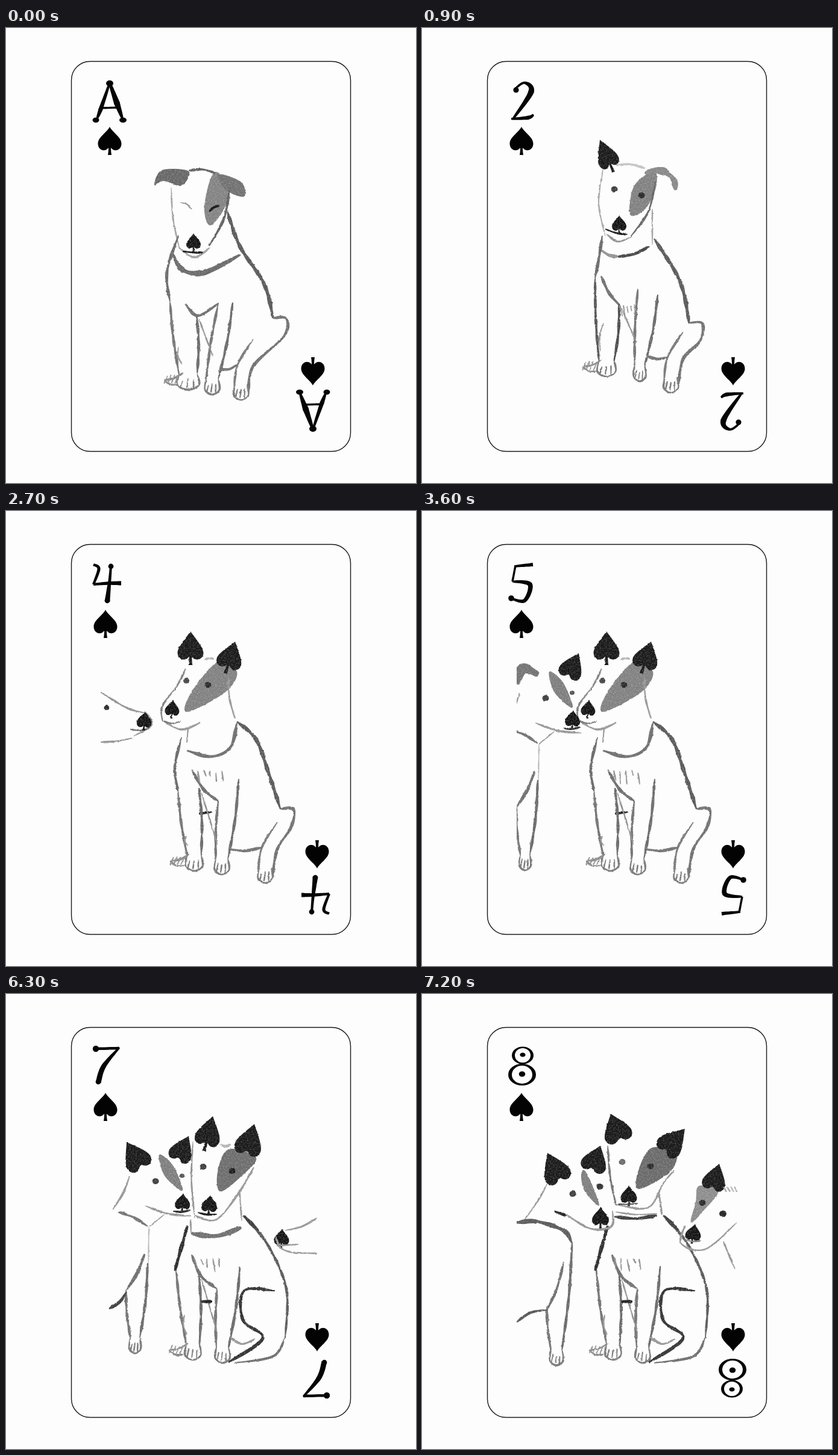
An HTML page that plays this animation: 680 px wide and 756 px high, repeating every 8000 ms.

```html
<!DOCTYPE html>
<html lang="en">
<head>
<meta charset="utf-8">
<title>Dogs of spades</title>
<style>
  html, body { margin: 0; width: 100%; height: 100%; overflow: hidden; background: #fdfdfd; }
  svg { display: block; width: 680px; height: 756px; }
</style>
</head>
<body>
<svg id="stage" viewBox="0 0 680 756">
  <defs>
    <filter id="brush" filterUnits="userSpaceOnUse" x="100" y="170" width="470" height="470" color-interpolation-filters="sRGB">
      <feTurbulence type="fractalNoise" baseFrequency=".2" numOctaves="2" seed="4" result="edge"/>
      <feDisplacementMap in="SourceGraphic" in2="edge" scale="2.6" xChannelSelector="R" yChannelSelector="G" result="rough"/>
      <feTurbulence type="fractalNoise" baseFrequency=".4" numOctaves="2" seed="9"/>
      <feColorMatrix values="0 0 0 0 0  0 0 0 0 0  0 0 0 0 0  .5 0 0 0 .7" result="grain"/>
      <feComposite in="rough" in2="grain" operator="in"/>
    </filter>
    <clipPath id="window"><rect x="157" y="170" width="366" height="470"/></clipPath>
  </defs>
  <rect x="108.5" y="55.5" width="463" height="648" rx="31" fill="none" stroke="#1a1a1a" stroke-width="1.4"/>
</svg>
<script>
const stage = document.getElementById('stage');
let out = '';
let seed = 7;
const random = () => (seed = seed * 16807 % 2147483647) / 2147483647;

const tone = g => `rgb(${g},${g},${g})`;
const parse = text => text.split(' ').map(p => p.split(',').map(Number));
const outline = pts => 'M' + pts.map(p => p[0].toFixed(1) + ' ' + p[1].toFixed(1)).join('L') + 'Z';

// Catmull-Rom samples [x, y, width factor] through a few key points
function smooth(points, closed) {
  const n = points.length, spans = closed ? n : n - 1, steps = 10;
  const at = i => points[closed ? (i + n) % n : Math.max(0, Math.min(n - 1, i))];
  return Array.from({ length: spans * steps + 1 }, (_, k) => {
    const i = Math.min(spans - 1, Math.floor(k / steps)), t = k / steps - i;
    const [a, b, c, d] = [at(i - 1), at(i), at(i + 1), at(i + 2)];
    const mix = j => b[j] + t / 2 * (c[j] - a[j] + t * (2 * a[j] - 5 * b[j] + 4 * c[j] - d[j] + t * (3 * (b[j] - c[j]) + d[j] - a[j])));
    const wb = b[2] ?? 1, wc = c[2] ?? 1;
    return [mix(0), mix(1), wb + (wc - wb) * t];
  });
}

function brush(width, grey, points, wobble = .22) {
  const s = smooth(points), last = s.length - 1, left = [], right = [];
  s.forEach(([x, y, f], i) => {
    const p = s[Math.max(0, i - 1)], q = s[Math.min(last, i + 1)];
    const dx = q[0] - p[0], dy = q[1] - p[1], len = Math.hypot(dx, dy) || 1;
    const taper = wobble ? Math.min(1, .45 + Math.min(i, last - i) * .15) : 1;
    const h = width / 2 * f * taper * (1 + wobble * Math.sin(x * .13 + y * .21));
    left.push([x - dy / len * h, y + dx / len * h]);
    right.unshift([x + dy / len * h, y - dx / len * h]);
  });
  out += `<path d="${outline(left.concat(right))}" fill="${tone(grey)}"/>`;
}
const ink = (width, grey, text) => brush(width, grey, parse(text));
const pen = (width, text) => brush(width, 5, parse(text), 0);
// Stroke between two points, pushed sideways by bow (down when it runs right, left when it runs down)
function arc(width, grey, x1, y1, x2, y2, bow = 0) {
  const dx = x2 - x1, dy = y2 - y1, k = bow / Math.hypot(dx, dy);
  brush(width, grey, [[x1, y1], [(x1 + x2) / 2 - dy * k, (y1 + y2) / 2 + dx * k], [x2, y2]]);
}
const wash = (grey, text) => out += `<path d="${outline(smooth(parse(text), true))}" fill="${tone(grey)}"/>`;
const dot = (x, y, rx, ry = rx, grey = 5) => out += `<ellipse cx="${x}" cy="${y}" rx="${rx}" ry="${ry}" fill="${tone(grey)}"/>`;
const eye = (x, y, grey = 40, r = 5.5) => dot(x, y, r, r * .9, grey);
function ring(x, y, rx, ry, side, top) {
  const loop = (a, b) => `M${x - a} ${y}a${a} ${b} 0 1 0 ${2 * a} 0a${a} ${b} 0 1 0 ${-2 * a} 0Z`;
  out += `<path fill-rule="evenodd" fill="#050505" d="${loop(rx, ry) + loop(rx - side, ry - top)}"/>`;
}

const PIP = 'C3 8 19.5 17 19.5 28', PIP_BACK = 'C-19.5 17-3 8 0 0Z';
const EAR = 'C5 7 19.5 22 19.5 30', EAR_BACK = 'C-19.5 22-5 7 0 0Z';
function spade(x, y, w, h, turn, stem, grey, side, back) {
  const foot = stem ? 'C2 40 2.5 44 3 47L-3 47C-2.5 44-2 40-2 35' : 'L-2 35';
  out += `<path transform="translate(${x} ${y}) rotate(${turn}) scale(${w / 39} ${h / (stem ? 47 : 40)})" fill="${tone(grey)}"
    d="M0 0${side}C19.5 39 8 43 2 35${foot}C-8 43-19.5 39-19.5 ${side === EAR ? 30 : 28}${back}"/>`;
}
const ear = (x, y, w, h, turn, stem = false) => spade(x, y, w, h, turn, stem, 24, EAR, EAR_BACK);
const nose = (x, y, w, turn = 0) => spade(x, y, w, w * 1.28, turn, true, 18, PIP, PIP_BACK);

const ranks = {
  A() {
    dot(172, 92, 6, 5); dot(149, 153, 5.5, 4.2); dot(194, 153, 6, 4.2);
    pen(4.5, '171,94,.8 157,135,1.6 150,153,.5');
    pen(9, '173,94,.5 184,125,1.1 194,153,.3');
    pen(3.4, '159,133 188,132');
  },
  2() {
    dot(156, 103, 4.6);
    pen(8, '153,102,.4 170,91,.5 181,106,1.2 151,151,.4');
    pen(6.5, '148,151,.5 176,149,1 185,144,.5');
  },
  3() {
    dot(149, 98, 4.6); dot(147, 145, 4.5);
    pen(8, '147,97,.4 168,90,.6 178,103,1.1 160,118,.4');
    pen(8, '160,118,.4 182,133,1.2 166,151,.6 146,145,.4');
  },
  4() {
    pen(4, '145,89 154,96,1.3 145,122'); pen(5.5, '145,122,.7 170,120 191,120,1.3');
    dot(174, 92, 4.4); dot(168, 149, 4.3); pen(6, '174,91,.6 172,115,.8 168,150,1.5');
  },
  5() {
    pen(5, '153,92,.7 184,89,1.2'); pen(3.5, '155,91 150,117');
    pen(8, '150,117,.4 179,122,1 170,149,.8 147,145,.4'); dot(148, 145, 4.8);
  },
  6() {
    dot(179, 91, 4.6); pen(6, '179,91,.8 158,109,.7 146,134,1.2');
    ring(165, 136, 21, 18, 5, 2.5); dot(164.5, 138, 5.3);
  },
  7() {
    dot(149, 91, 5.2); dot(153, 146, 4.3);
    pen(4.5, '149,91 188,90'); pen(9, '188,89,.3 162,120,.9 153,147,1');
  },
  8() {
    ring(167, 102, 18, 14.5, 5, 2.5); dot(167, 101, 4.6, 3.6);
    ring(166, 134, 23, 18, 6, 3); dot(166, 133, 5.3, 4.6);
  }
};

// Paw standing on (x, y) with a few toe lines
function paw(x, y, w, grey = 120) {
  brush(3, grey, [[x - w * .42, y - 26], [x - w / 2, y - 8], [x, y], [x + w / 2, y - 8], [x + w * .42, y - 26]]);
  for (let i = -1; i <= 1; i++) arc(2.2, grey, x + i * w / 4, y - 15 - 5 * random(), x + i * w / 3.2 - 2, y - 3);
}
// Foreleg from its left and right top to a paw
function leg(x1, y1, x2, y2, x, y, w, grey = 115) {
  arc(4.2, grey, x1, y1, x - w * .42, y - 26, 2);
  arc(4.4, grey - 10, x2, y2, x + w * .42, y - 26, -3);
  paw(x, y, w);
}
function lyingPaw(x, y) {
  arc(3, 135, x + 32, y - 12, x, y, -3);
  arc(3, 135, x, y, x + 24, y + 7, 4);
  for (let i = 1; i < 5; i++) arc(2, 145, x + 6 * i, y - 6 - random() * 4, x + 6 * i - 6, y + 6);
}
function tuft(x, y, w) {
  for (let i = 0; i < 5; i++) {
    const px = x + w * i / 4;
    arc(2.2, 145, px, y + 4 * random(), px + 5 * random(), y + 10 + 16 * random());
  }
}
// Rump and hind leg from the end of the back to the foot
function haunch(x, y, fx, fy) {
  brush(4.6, 112, [[x, y], [x + 22, y + 1], [x + 18, y + 30], [fx + 8, fy - 53], [fx, fy - 8]]);
  brush(3.5, 120, [[fx + 8, fy - 98], [fx - 18, fy - 55], [fx - 24, fy - 10]]);
  paw(fx - 12, fy + 3, 24);
}
// Seated torso; fore and mid hold the tops and the paw of the two forelegs
function seated({ flank, back, chest, fore, mid, foot, fluff }) {
  const [x1, y1, x2, y2, px, py] = fore, [mx, my, , , qx, qy] = mid;
  ink(4.5, 105, flank);
  ink(6, 88, back);
  ink(4.8, 110, chest);
  leg(...fore);
  leg(...mid);
  lyingPaw(px - 40, py - 16);
  arc(2.4, 145, x2 + 4, y2 + 8, (mx + qx) / 2 - 4, (my + qy) / 2 + 12);
  arc(2.4, 150, x1 + 14, y1 + 75, px - 10, py - 42, 4);
  if (fluff) tuft(...fluff);
  if (!foot) return;
  haunch(...parse(back).at(-1), ...foot);
  arc(4.5, 115, qx + 12, qy - 42, foot[0] - 18, foot[1] - 56, 4);
}

function sleeper() {
  wash(102, '246,260 259,236 303,238 291,262 262,254');
  wash(130, '345,240 369,262 362,300 338,328 329,295');
  wash(112, '352,243 390,256 395,280 366,270');
  arc(4, 95, 303, 237, 347, 241, -4);
  arc(4, 95, 371, 265, 337, 362, -8);
  arc(2.4, 160, 274, 265, 288, 368, 4);
  arc(3, 160, 287, 365, 338, 365, 16);
  arc(2.4, 150, 289, 290, 308, 301, -3);
  arc(3.5, 25, 337, 305, 354, 295, -2);
  nose(311, 341, 24);
  arc(3.5, 25, 293, 371, 327, 373, 1);
  ink(8, 105, '276,375,.7 293,402 330,406 388,377');
  seated({
    flank: '286,345 267,405 272,455', back: '367,305 388,363 428,425 443,482', chest: '297,458 318,478 353,457',
    fore: [272, 455, 316, 475, 302, 601, 36], mid: [352, 458, 376, 456, 342, 609, 24], foot: [402, 615]
  });
}

function alert() {
  ear(295, 186, 35, 58, -23, true);
  wash(128, '345,310 352,262 385,238 388,265 370,301');
  arc(11, 135, 370, 241, 408, 240, -4);
  arc(9, 135, 402, 238, 421, 270, -6);
  arc(4, 195, 322, 228, 370, 233, -4);
  arc(2.4, 165, 300, 235, 304, 346, 9);
  arc(3.2, 100, 387, 255, 345, 348, -10);
  arc(3.2, 145, 306, 342, 345, 348, 10);
  arc(2.2, 160, 382, 300, 382, 360);
  eye(319, 268, 60); eye(364, 278);
  nose(327, 311, 24);
  arc(3, 25, 304, 334, 340, 343, 2);
  arc(5, 145, 297, 369, 325, 380, 3);
  arc(6, 70, 325, 380, 377, 363, 4);
  seated({
    flank: '299,345 293,385 287,415', back: '385,350 420,405 434,440 443,490', chest: '297,412 310,440 327,460',
    fore: [287, 415, 327, 458, 306, 579, 30, 85], mid: [358, 433, 391, 443, 361, 587, 20], foot: [425, 603], fluff: [328, 458, 24]
  });
}

function sitter() {
  wash(128, '352,250 383,266 365,300 300,334 308,300');
  ear(306, 200, 43, 56, 0, true); ear(380, 217, 42, 55, 17, true);
  ink(3, 130, '298,262 284,290 259,325 260,350');
  arc(3, 150, 260, 348, 322, 352, 13);
  arc(3, 150, 369, 275, 380, 345, 4);
  arc(2.5, 120, 261, 349, 290, 349, 4);
  arc(2.5, 150, 302, 360, 300, 385);
  arc(3, 180, 330, 247, 345, 246, -2);
  eye(299, 282, 70, 5); eye(335, 289);
  nose(277, 314, 24, 5);
  ink(5.5, 110, '300,398 340,408 372,393 383,352');
  arc(4.5, 35, 320, 503, 341, 500);
  seated({
    flank: '291,376 280,425 285,465', back: '383,350 415,380 437,440 455,495', chest: '308,430 328,463 352,482',
    fore: [285, 465, 320, 460, 312, 598, 28], mid: [352, 482, 386, 445, 358, 604, 24], foot: [442, 615], fluff: [318, 430, 40]
  });
}

function visitorMuzzle() {
  ink(3, 145, '157,301 200,327 232,336');
  ink(3, 145, '232,335 242,355 212,374');
  arc(3, 145, 157, 384, 210, 377, 2);
  arc(2.5, 100, 206, 363, 237, 362, 2);
  eye(167, 327, 40, 4.5);
  nose(231, 333, 25, 5);
}

function frontBody() {
  seated({
    flank: '308,385 298,420 287,460', back: '400,368,.9 440,415,.7 472,490,.7 470,572,.6', chest: '315,433 330,468 357,490',
    fore: [289, 458, 327, 465, 317, 608, 26], mid: [357, 490, 395, 453, 366, 613, 24], fluff: [320, 437, 40]
  });
  arc(5.5, 45, 308, 385, 287, 460, 0);
  arc(5, 60, 401, 368, 426, 393);
  ink(3.5, 110, '470,570 450,602 385,613');
  ink(4.8, 50, '453,493 402,493 400,542 433,572 376,612');
  arc(4, 150, 378, 570, 420, 573, 10);
  arc(4.5, 35, 330, 511, 349, 511);
}

function frontHead() {
  wash(108, '376,258 422,272 395,305 362,328 358,295');
  ear(350, 203, 42, 60, 14, true); ear(419, 216, 45, 54, 16);
  arc(2.5, 140, 317, 245, 320, 372, 4);
  ink(3.3, 150, '320,368 355,375 390,335 418,288');
  arc(2.5, 150, 394, 325, 398, 377);
  arc(2.5, 150, 313, 375, 314, 398);
  arc(4, 180, 362, 250, 380, 250, 3);
  eye(334, 287, 60); eye(382, 294, 25);
  nose(346, 334, 26, 6);
  arc(3, 25, 325, 363, 357, 366, 2);
  arc(8, 110, 314, 398, 397, 388, 9);
}

function friend(earUp = true) {
  if (earUp) ear(207, 246, 44, 52, -31);
  else arc(14, 115, 208, 288, 243, 272, -20);
  ear(310, 236, 39, 46, 25);
  wash(125, '261,267 284,285 300,327 270,302');
  eye(255, 311, 60); eye(299, 302, 80, 4);
  nose(301, 331, 25, 4);
  arc(3, 40, 284, 361, 313, 359, 2);
  ink(3.3, 150, '238,352 275,365 315,369');
  arc(3.3, 150, 212, 303, 184, 358, -3);
  arc(4.5, 115, 193, 362, 242, 386, -3);
  arc(2, 150, 244, 387, 270, 366);
  arc(2, 185, 244, 388, 243, 450);
  arc(5, 110, 237, 432, 207, 492, -3);
  leg(206, 492, 242, 447, 221, 597, 19);
  arc(4.5, 65, 178, 523, 207, 495, 4);
}

function newcomerMuzzle() {
  nose(458, 390, 25, 3);
  arc(3, 150, 463, 393, 516, 372, 4);
  arc(3, 150, 447, 402, 475, 430, 8);
  arc(3, 150, 475, 430, 516, 431);
  arc(3, 140, 448, 418, 485, 416);
}

function trio() {
  frontBody();
  wash(105, '380,256 420,264 412,295 360,324 358,296');
  ear(313, 199, 47, 50, -20); ear(436, 224, 44, 54, 42);
  arc(3.3, 115, 308, 252, 322, 352, 3);
  ink(3, 150, '322,350 375,355 400,315 418,293');
  arc(3, 150, 393, 330, 398, 368);
  arc(2.5, 150, 320, 362, 390, 365, 3);
  eye(332, 279, 105); eye(379, 286);
  nose(343, 318, 27);
  arc(2.5, 70, 325, 349, 358, 348, 1);
  arc(5, 60, 319, 370, 390, 368, 4);

  ear(208, 264, 45, 54, -25); ear(296, 252, 43, 46, 20);
  wash(125, '264,300 273,297 294,351 270,328');
  eye(250, 332, 60); eye(295, 320, 50);
  nose(296, 354, 28);
  arc(4.5, 35, 219, 361, 239, 368);
  ink(3.3, 150, '238,366 280,390 314,386 316,360');
  arc(2.5, 150, 208, 315, 170, 375, -2);
  ink(6.5, 90, '157,380 190,378 235,393 248,413');
  arc(4, 110, 235, 445, 205, 530, -4);
  leg(207, 520, 249, 412, 223, 617, 22);
  arc(4, 85, 208, 525, 157, 545, 6);
}

function newcomer() {
  wash(140, '459,319 492,326 470,357 446,380 454,345');
  ear(493, 282, 39, 46, 16);
  eye(465, 347); eye(499, 365, 35, 6);
  nose(453, 382, 26, 10);
  ink(3, 150, '436,385 430,415 470,424 522,380');
  arc(3, 150, 500, 412, 519, 457);
  arc(2.5, 130, 436, 408, 462, 410, 2);
  for (let i = 0; i < 4; i++) arc(2.2, 165, 500 + 6 * i, 320, 505 + 6 * i, 329);
}

function draw(attrs, paint) {
  const before = out;
  out = '';
  paint();
  out = `${before}<g ${attrs}>${out}</g>`;
}
const shifted = (dx, ...parts) => draw(`transform="translate(${dx} 0)"`, () => parts.forEach(part => part()));

const scenes = [
  [0, 'A', sleeper],
  [900, 2, alert],
  [1800, 3, sitter],
  [2700, 4, () => { sitter(); visitorMuzzle(); }],
  [3600, 5, () => { sitter(); shifted(-50, () => friend(false)); }],
  [4500, 6, () => { frontBody(); frontHead(); friend(); }],
  [6300, 7, () => { shifted(-7, frontBody, frontHead, friend); newcomerMuzzle(); }],
  [7200, 8, () => { trio(); newcomer(); }]
];

function corner(rank) {
  ranks[rank]();
  spade(rank === 'A' ? 172 : 165, 164, 39, 47, 0, true, 3, PIP, PIP_BACK);
}
for (const [, rank, dogs] of scenes) {
  draw('class="scene" visibility="hidden"', () => {
    draw('', () => corner(rank));
    draw('transform="rotate(180 340.5 379)"', () => corner(rank));
    draw('clip-path="url(#window)"', () => draw('filter="url(#brush)"', dogs));
  });
}
stage.insertAdjacentHTML('beforeend', out);

const groups = [...stage.querySelectorAll('.scene')];
function show() {
  const time = performance.now() % 8000;
  const current = scenes.findLastIndex(([start]) => time >= start);
  groups.forEach((g, i) => g.setAttribute('visibility', i === current ? 'visible' : 'hidden'));
  requestAnimationFrame(show);
}
show();
</script>
</body>
</html>
```
